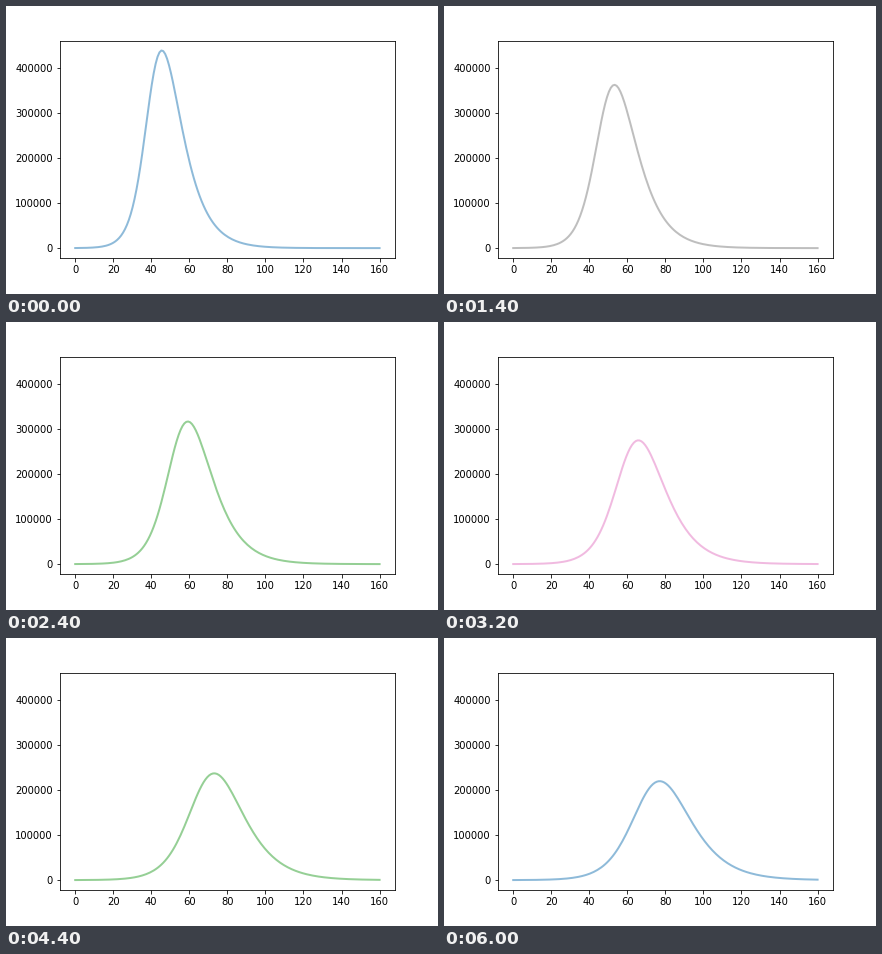
A matplotlib script for the animation above (6200 ms loop, 432 px wide and 288 px high).

```python
import numpy as np
import matplotlib.pyplot as plt
from matplotlib.animation import FuncAnimation

FRAMES, INTERVAL = 31, 200
POPULATION = 2_000_000
GAMMA = 0.155
DAYS = np.linspace(0, 160, 160)
# Frames at which the reproduction number drops by one level
DROPS = [3, 5, 7, 9, 11, 14, 16, 19, 22, 25]


def outbreak(r0, dt=0.1, span=280):
    """Infected share over time in an SIR model (midpoint steps)."""
    def slope(s, i):
        new = r0 * GAMMA * s * i
        return -new, new - GAMMA * i

    time = np.arange(0, span, dt)
    infected = np.empty_like(time)
    s, i = 1 - 1e-6, 1e-6
    for k in range(len(time)):
        infected[k] = i
        ds, di = slope(s, i)
        ds, di = slope(s + ds * dt / 2, i + di * dt / 2)
        s, i = s + ds * dt, i + di * dt
    return time, infected


def curve(level):
    """Infected people per day, placed by day and height of the peak."""
    time, infected = outbreak(2.37 * (1.765 / 2.37) ** (level / 10))
    infected *= POPULATION
    top = infected.argmax()
    peak_day = 45.5 * 1.054 ** level
    height = 439_500 - 27_000 * level + 505 * level ** 2
    values = np.interp(DAYS - peak_day + time[top], time, infected)
    return values * height / infected[top]


curves = [curve(level) for level in range(len(DROPS) + 1)]

fig = plt.figure(figsize=(6, 4), dpi=72, facecolor="white")
fig.subplots_adjust(left=0.125, right=0.9, bottom=0.125, top=0.88)
ax = fig.add_subplot()
line, = ax.plot(DAYS, curves[0], lw=2, alpha=0.5)
ax.set_xlim(-8, 168)
ax.set_ylim(-21_975, 461_475)


def update(frame):
    level = np.searchsorted(DROPS, frame, side="right")
    line.set_ydata(curves[level])
    line.set_color(f"C{frame % 10}")
    return line,


anim = FuncAnimation(fig, update, frames=FRAMES, interval=INTERVAL,
                     repeat=True, repeat_delay=0)
plt.show()
```
